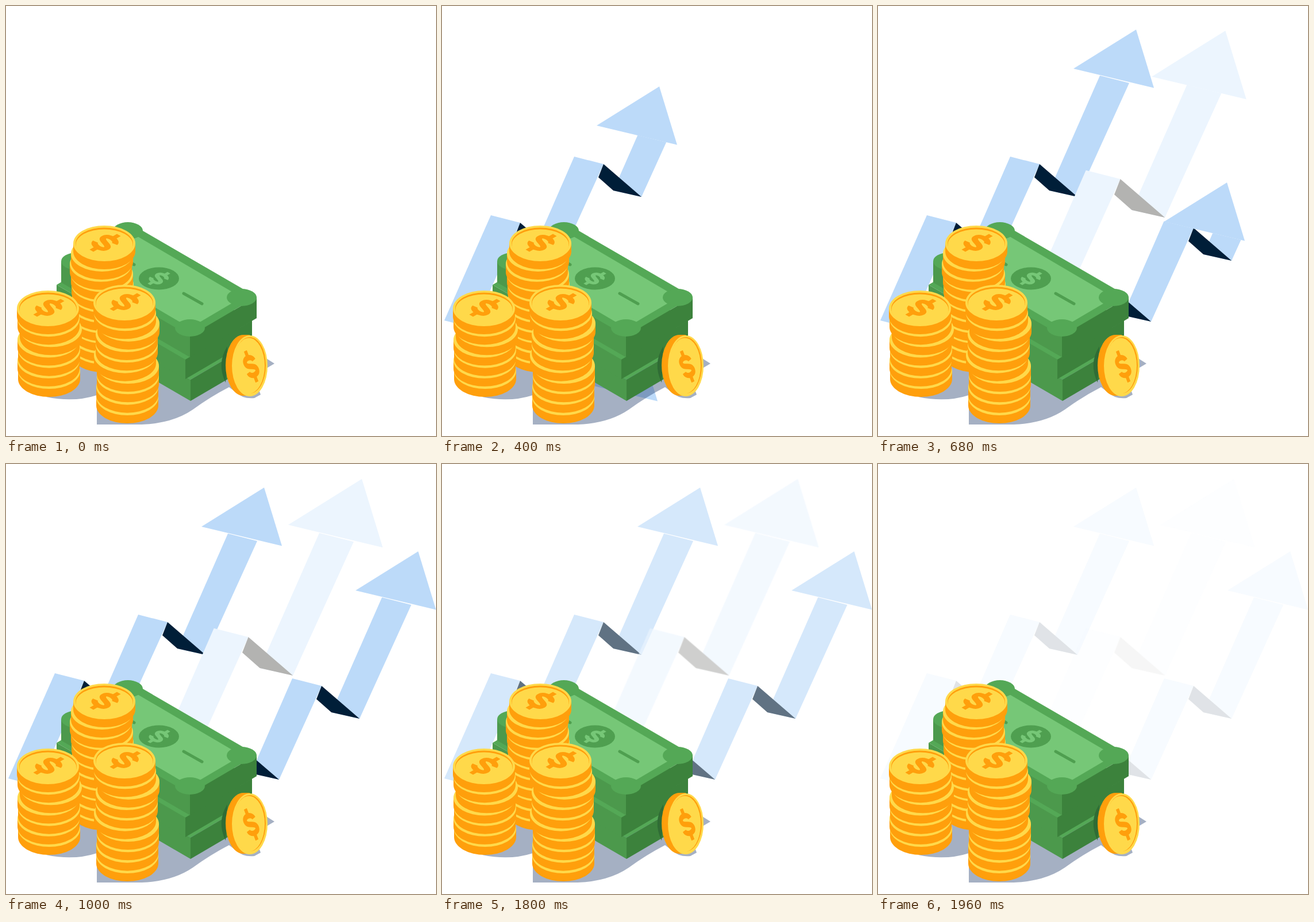
Recreate the animation shown at these times as an HTML page. Size 748 px wide and 748 px high, loop 2000 ms.

```html
<!DOCTYPE html>
<html lang="en">
<head>
<meta charset="utf-8">
<title>Growing money</title>
<style>
html, body { margin: 0; width: 100%; height: 100%; overflow: hidden; background: #fff; }
svg { display: block; width: 748px; height: 748px; }
</style>
</head>
<body>
<svg id="stage" viewBox="0 0 748 748"></svg>
<script>
const LOOP = 2000, STEP = 40;
const YELLOW = '#ffd94a', ORANGE = '#ff9f0c';
const stage = document.getElementById('stage');

const poly = (points, fill) => `<polygon points="${points}" fill="${fill}"/>`;
const oval = (x, y, rx, ry, fill) =>
  `<ellipse cx="${x}" cy="${y}" rx="${rx}" ry="${ry}" fill="${fill}"/>`;

// Flat dollar sign around the origin, laid onto a plane by a matrix
const dollar = (x, y, plane, color) =>
  `<g transform="matrix(${plane},${x},${y})" fill="none" stroke="${color}">
    <path stroke-width="9.5" d="M12-8C10-18-11.5-19-11.5-9C-11.5 2 11.5-2 11.5 9C11.5 19-11 18-12.5 8"/>
    <path stroke-width="8" d="M0-14V-29M0 14V29"/></g>`;
const FLOOR = '.82,.47,-.82,.47';

// A disc with a side of thickness 14
const disc = (x, y) =>
  `<path fill="${ORANGE}" d="M${x - 54} ${y}v14a54 31 0 0 0 108 0v-14z"/>` + oval(x, y, 54, 31, YELLOW);

function coinStack(top, bottom, xs) {
  const pitch = (bottom - top) / (xs.length - 1);
  const discs = xs.map((x, i) => disc(x, top + i * pitch)).reverse().join('');
  const x = xs[0];
  return discs + oval(x, top, 50, 27.5, ORANGE) + oval(x, top + 2, 49.5, 26.5, YELLOW) +
    dollar(x + 1.5, top - 1, FLOOR, ORANGE);
}

// A bundle of notes: x, y is the front corner of its top face
function bundle(x, y, height) {
  const left = [x - 224, y - 130], right = [x + 116, y - 68], back = [x - 108, y - 198];
  const low = ([px, py]) => [px, py + height];
  return poly([left, back, right, [x, y]], '#54a856') +
    poly([left, [x, y], low([x, y]), low(left)], '#4c994c') +
    poly([[x, y], right, low(right), low([x, y])], '#3c823c');
}

function notes() {
  const corners = [[320, 560], [410, 507], [212, 391], [122, 444]];
  return bundle(321, 650, 37) + bundle(312, 615, 34) + bundle(320, 574, 37) +
    poly(corners, '#76c777') +
    corners.map(([x, y]) => oval(x, y, 26, 15, '#54a856')).join('') +
    oval(266, 474, 35, 19.5, '#4f9f50') +
    dollar(266, 474, '.6,.345,-.6,.345', '#76c777') +
    `<path d="M309 500l32 18M190 431l33 19" stroke="#4f9f50" stroke-width="5" stroke-linecap="round"/>`;
}

const standingCoin = () =>
  `<path d="M385 592Q366 622 382 655z" fill="#2f6c35"/>` +
  oval(413, 625, 31, 53, ORANGE) +
  `<path fill="${ORANGE}" d="M413 572h11v106h-11z"/>` +
  oval(424, 626, 31, 53, YELLOW) + oval(424, 625, 28, 49, ORANGE) + oval(422.5, 626, 27.5, 48.5, YELLOW) +
  dollar(426.5, 627, '.62,-.3,.35,.93', ORANGE);

const shadow =
  `<g fill="#1e3a69" opacity=".4"><path d="M70 680Q118 690 158 677V728H236Q290 726 325 702
   Q355 680 388 663L400 672Q412 684 432 682L443 676L440 668L450 632L467 622L440 605H128V640z"/></g>`;

// Arrows: tip path as [time, x, y]
const sidePath = [[40, 76, 475], [200, 190, 366], [320, 339, 196], [400, 378, 140], [560, 441, 52], [620, 449, 41]];
const middlePath = [[320, 76, 475], [400, 150, 410], [560, 390, 122], [680, 436.5, 55.5], [760, 449, 41]];
const arrows = [
  { place: '', delay: 0, path: sidePath, light: '#bcdaf9', dark: '#001e38' },
  { place: 'translate(91.4 -22.2) scale(1.175)', delay: 0, path: middlePath, light: '#ecf5fe', dark: '#b3b3b1' },
  { place: 'translate(268 111)', delay: 360, path: sidePath, light: '#bcdaf9', dark: '#001e38' },
];

// The body is only shown below the base line of the moving head
const arrow = ({ place, light, dark }, i) =>
  `<g class="arrow" transform="${place}">
    <clipPath id="below${i}"><path class="moving" d="M-1000-147L1000 335V2000H-1000z"/></clipPath>
    <g clip-path="url(#below${i})">
      ${poly('4,547 85,364 136,377 55,560', light)}
      ${poly('158,427 230,262 281,275 207,438', light)}
      ${poly('298,321 386,121 437,134 347,332', light)}
      ${poly('136,377 127,400 158,427 207,438', dark)}
      ${poly('281,275 272,298 298,321 347,332', dark)}
    </g>
    <polygon class="moving" points="0,0 -109,68 31,101.5" fill="${light}"/>
  </g>`;

stage.innerHTML = arrows.map(arrow).join('') + shadow + notes() +
  coinStack(413, 592, [171, 167, 165, 167, 168, 169, 168, 168, 169, 168, 168]) +
  coinStack(526, 635, [73, 74, 78, 74, 75, 74, 75]) +
  coinStack(516, 681, [206, 207, 213, 210, 210, 207, 212, 212, 211, 211]) +
  standingCoin();

function along(path, time) {
  const next = path.findIndex(key => key[0] > time);
  if (next < 0) return path[path.length - 1].slice(1);
  const a = path[next - 1], b = path[next];
  const k = (time - a[0]) / (b[0] - a[0]);
  return [1, 2].map(n => a[n] + (b[n] - a[n]) * k);
}

const groups = [...document.querySelectorAll('.arrow')];

function draw(now) {
  const time = Math.floor(now % LOOP / STEP) * STEP;
  const fade = Math.min(1, (LOOP - time) / 320);
  groups.forEach((group, i) => {
    const { path, delay } = arrows[i];
    const local = time - delay;
    const shown = local >= path[0][0];
    group.setAttribute('opacity', shown ? fade : 0);
    if (!shown) return;
    const [x, y] = along(path, local);
    group.querySelectorAll('.moving').forEach(part => part.setAttribute('transform', `translate(${x} ${y})`));
  });
}

let start;
function tick(now) {
  start ??= now;
  draw(now - start);
  requestAnimationFrame(tick);
}
draw(0);
requestAnimationFrame(tick);
</script>
</body>
</html>
```
